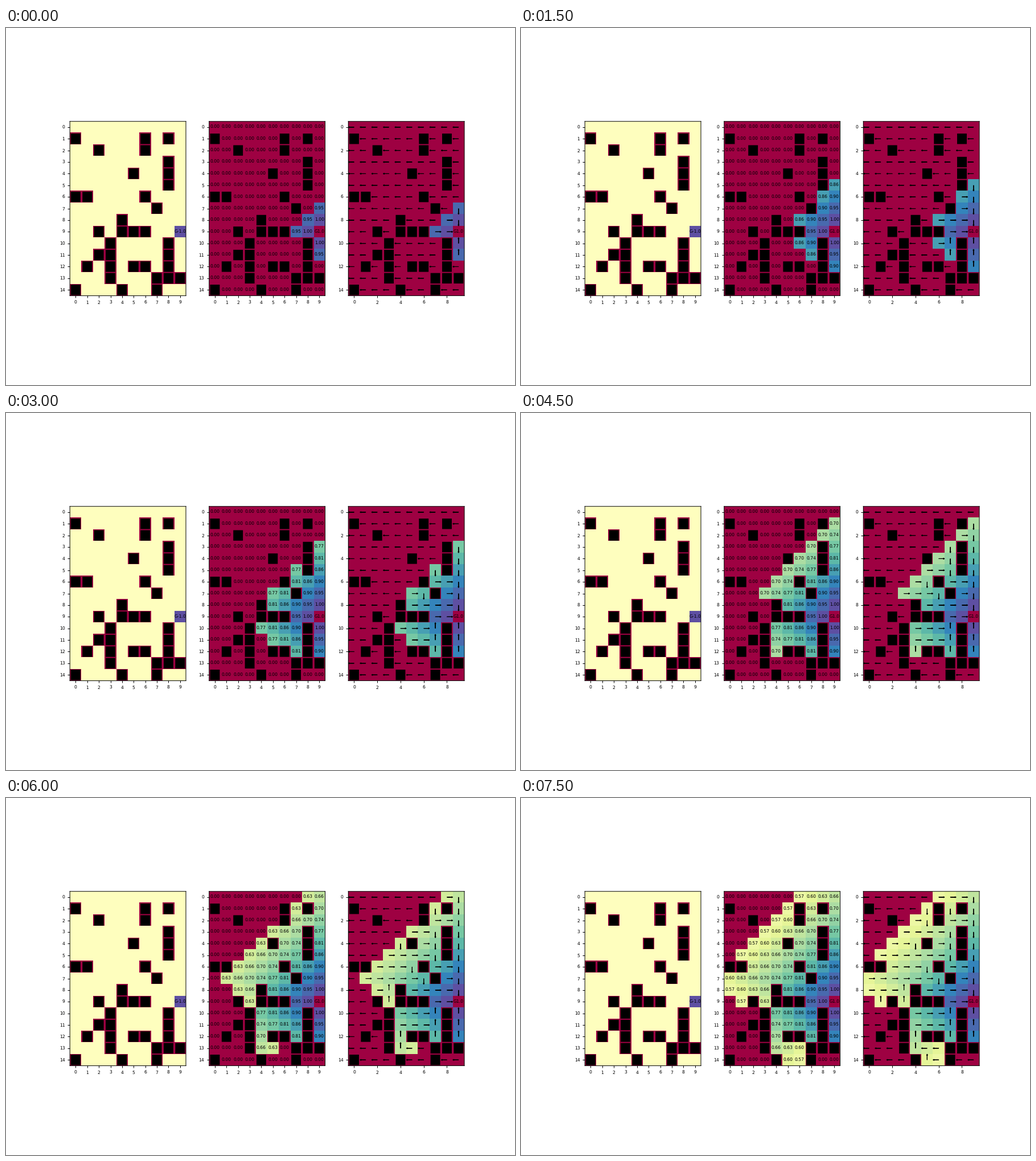
Recreate the animation shown at these times as a matplotlib script. Size 894 px wide and 626 px high, loop 8 s.

```python
import matplotlib.pyplot as plt
import numpy as np
from matplotlib.animation import FuncAnimation
from matplotlib.patches import Rectangle

DPI = 89.4
ROWS, COLS = 15, 10
GOAL = (9, 9)
GAMMA = 0.95
# blocked columns of each row, top to bottom
WALLS = ["", "068", "26", "8", "58", "8", "016", "7", "4", "2456",
         "38", "238", "13568", "3789", "047"]
# row and column steps, in tie-break order: left, right, up, down
MOVES = [(0, -1), (0, 1), (-1, 0), (1, 0)]
FRAME_MS = 500
FRAMES = 16
FRAMES_PER_STEP = 3

wall = np.array([[str(c) in row for c in range(COLS)] for row in WALLS])


def neighbours(cell):
    """Yield (move, cell) for each open cell next to the given one."""
    for dr, dc in MOVES:
        r, c = cell[0] + dr, cell[1] + dc
        if 0 <= r < ROWS and 0 <= c < COLS and not wall[r, c]:
            yield (dr, dc), (r, c)


def distances():
    dist = np.full((ROWS, COLS), np.inf)
    dist[GOAL] = 0
    queue = [GOAL]
    for cell in queue:
        for _, near in neighbours(cell):
            if np.isinf(dist[near]):
                dist[near] = dist[cell] + 1
                queue.append(near)
    return dist


dist = distances()
open_cells = [(r, c) for r in range(ROWS) for c in range(COLS)
              if not wall[r, c] and (r, c) != GOAL]


def values(step):
    """Value table after two sweeps per step."""
    reached = (dist > 0) & (dist <= 2 * step + 2)
    return np.where(reached, GAMMA ** (dist - 1), 0.0)


def best_move(cell):
    options = list(neighbours(cell))
    if not options or np.isinf(dist[cell]):
        return MOVES[0]
    return min(options, key=lambda option: dist[option[1]])[0]


def label(ax, cell, text):
    return ax.text(cell[1], cell[0], text, ha="center", va="center")


def draw_walls(ax):
    w, h = 0.83, 0.9
    for r, c in np.argwhere(wall):
        ax.add_patch(Rectangle((c - w / 2, r - h / 2), w, h,
                               facecolor="black", linewidth=0, zorder=3))


def draw_arrow(ax, cell, move):
    r, c = cell
    dr, dc = move
    return ax.arrow(c, r, 0.4 * dc, 0.4 * dr, head_width=0.1,
                    head_length=0.1, color="black", linewidth=0.9)


# soft, unsnapped edges and glyphs
plt.rcParams.update({"font.family": "DejaVu Sans", "font.size": 6.2,
                     "text.hinting": "none", "path.snap": False})
fig, axes = plt.subplots(1, 3, figsize=(894 / DPI, 626 / DPI), dpi=DPI)
fig.subplots_adjust(left=0.1255, right=0.9005, bottom=0.1093, top=0.8793)
reward_ax, value_ax, policy_ax = axes

reward = np.where(wall, -1.0, 0.0)
reward[GOAL] = 1.0
reward_ax.imshow(reward, cmap="Spectral", vmin=-1, vmax=1)
tables = [ax.imshow(values(0), cmap="Spectral", vmin=0, vmax=1)
          for ax in (value_ax, policy_ax)]

for ax, goal_text, gap in zip(axes, ("G-1.0", "G1.0", "G1.0"), (1, 1, 2)):
    ax.autoscale(False)
    ax.set_xticks(range(0, COLS, gap))
    ax.set_yticks(range(0, ROWS, 1 if gap == 1 else 2))
    draw_walls(ax)
    label(ax, GOAL, goal_text)

numbers = {cell: label(value_ax, cell, "") for cell in open_cells}
idle = {cell: draw_arrow(policy_ax, cell, MOVES[0]) for cell in open_cells}
best = {cell: draw_arrow(policy_ax, cell, best_move(cell))
        for cell in open_cells}


def update(i):
    table = values(i // FRAMES_PER_STEP)
    for image in tables:
        image.set_data(table)
    for cell in open_cells:
        known = table[cell] > 0
        numbers[cell].set_text(f"{table[cell]:.2f}")
        best[cell].set_visible(known)
        idle[cell].set_visible(not known)
    return [*tables, *numbers.values(), *idle.values(), *best.values()]


anim = FuncAnimation(fig, update, frames=FRAMES, interval=FRAME_MS,
                     init_func=lambda: update(0), repeat=True,
                     repeat_delay=0)
plt.show()
```
